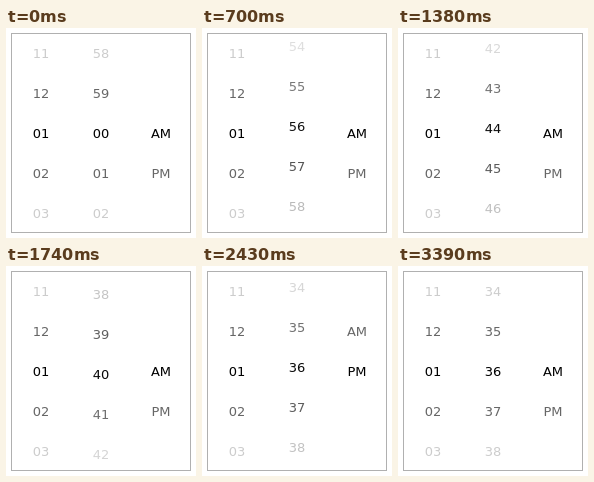
Write an HTML page with a canvas that moves like this. It is 190x210 px and loops after 4750 ms.

```html
<!DOCTYPE html>
<html lang="en">
<head>
<meta charset="utf-8">
<title>Time picker</title>
<style>
  html, body { margin: 0; width: 100%; height: 100%; overflow: hidden; background: #fff; }
  canvas { display: block; }
</style>
</head>
<body>
<canvas id="stage" width="190" height="210"></canvas>
<script>
const LOOP = 4750, ROW = 40, BASELINE = 110;
const ctx = document.getElementById('stage').getContext('2d');

const progress = (t, start, end) => Math.min(1, Math.max(0, (t - start) / (end - start)));
const easeOut = u => 1 - (1 - u) ** 2;
const pad = n => String(n).padStart(2, '0');

const hourLabel = i => pad((i + 11) % 12 + 1);
const minuteLabel = i => pad((i + 60) % 60);
const periodLabel = i => ['AM', 'PM'][i];

// Drag that speeds up, then a flick slowing down at a constant rate.
function minuteAt(t) {
  if (t < 700) {
    const u = progress(t, 400, 700);
    return 60 - 3.8 * (0.295 * u + 0.705 * u * u);
  }
  if (t >= 2620) return 36;
  const rest = 20.2 * (1 - progress(t, 700, 2561)) ** 2;
  return 36 + Math.max(rest, 1 / ROW);
}

// Flick past the end of the list, then spring back.
function flick(t, start, peak, end, overshoot) {
  return (1 + overshoot) * easeOut(progress(t, start, peak))
    - overshoot * easeOut(progress(t, peak, end));
}

const periodAt = t =>
  flick(t, 1800, 2020, 2270, 31 / ROW) - flick(t, 2990, 3180, 3390, 22 / ROW);

function drawWheel(x, position, label) {
  const nearest = Math.round(position);
  for (let i = nearest - 3; i <= nearest + 3; i++) {
    const distance = i - position;
    const text = label(i);
    const alpha = 1 - 0.4 * Math.abs(distance);
    if (!text || alpha <= 0) continue;
    ctx.globalAlpha = alpha;
    ctx.fillText(text, x, BASELINE + Math.round(distance * ROW));
  }
  ctx.globalAlpha = 1;
}

function draw(now) {
  const t = now % LOOP;
  ctx.fillStyle = '#fff';
  ctx.fillRect(0, 0, 190, 210);
  ctx.strokeStyle = '#b0b0b0';
  ctx.strokeRect(5.5, 5.5, 179, 199);
  ctx.fillStyle = '#000';
  ctx.font = '13px "DejaVu Sans", sans-serif';
  ctx.textAlign = 'center';
  drawWheel(35, 1, hourLabel);
  drawWheel(95, minuteAt(t), minuteLabel);
  drawWheel(155, periodAt(t), periodLabel);
}

const begin = performance.now();
function tick() {
  draw(performance.now() - begin);
  requestAnimationFrame(tick);
}
tick();
</script>
</body>
</html>
```
